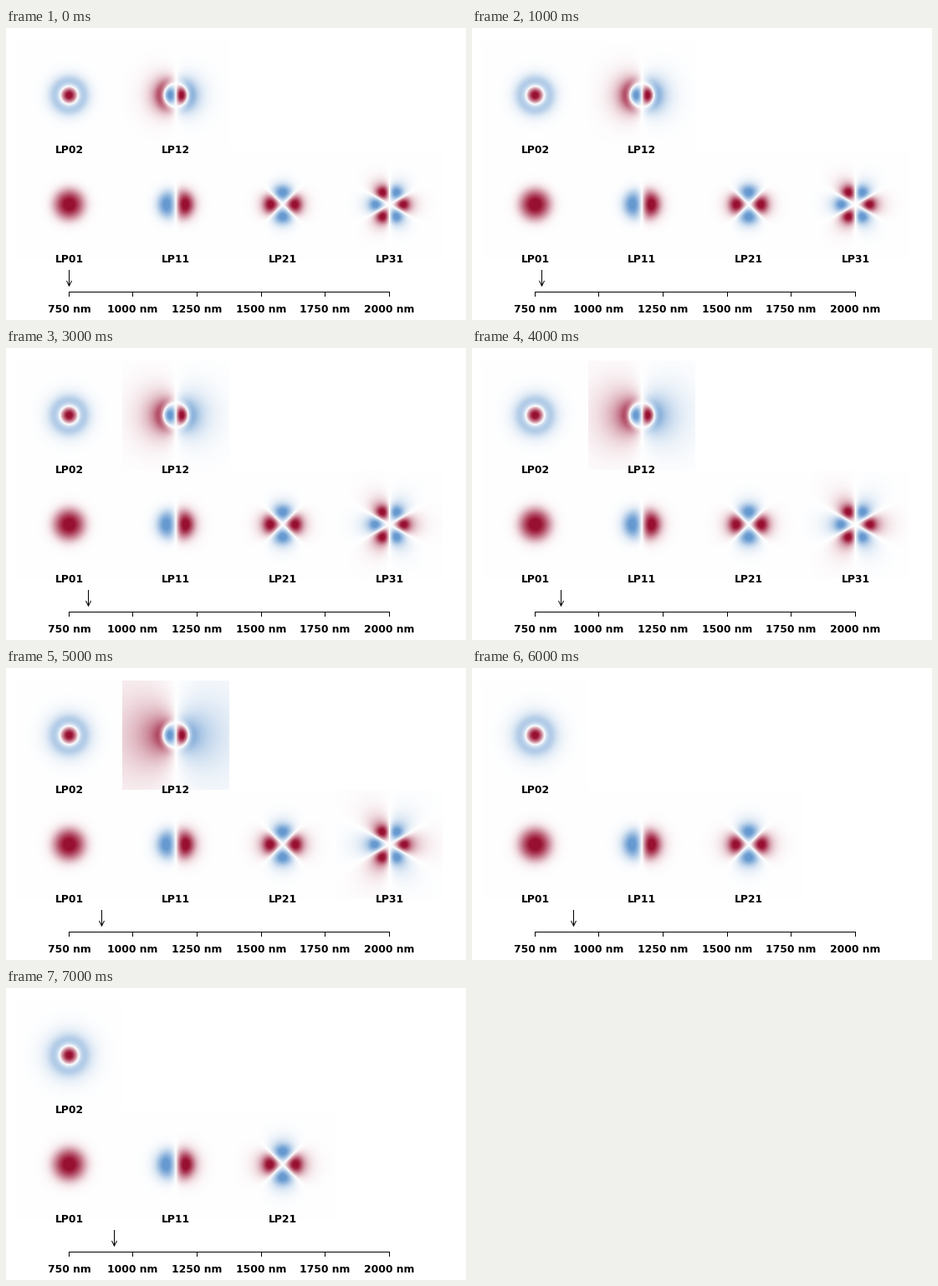
A matplotlib script that plays this animation: 550 px wide and 350 px high, repeating every 8 s.

```python
import numpy as np
import matplotlib.pyplot as plt
from matplotlib.animation import FuncAnimation

W, H, DPI = 550, 350, 100
STEPS = 8
CELL_W, CELL_H = 383 / 3, 130
LEFT, TOP_Y, BOTTOM_Y = 75.5, 80.5, 211.5
CORE = 25.5              # core radius in pixels
ALPHA = 5.3              # index profile exponent
CUTOFF_NM = 885          # wavelength at which LP12 stops being guided
RED = np.array([152, 16, 50]) / 255
BLUE = np.array([102, 153, 208]) / 255

# (l, m), column, row centre, wavelength from which the mode is gone
MODES = [
    ((0, 2), 0, TOP_Y, 2000),
    ((1, 2), 1, TOP_Y, CUTOFF_NM),
    ((0, 1), 0, BOTTOM_Y, 2000),
    ((1, 1), 1, BOTTOM_Y, 2000),
    ((2, 1), 2, BOTTOM_Y, 2000),
    ((3, 1), 3, BOTTOM_Y, CUTOFF_NM),
]

# radial grid in units of the core radius
N, R_MAX = 360, 12
STEP = R_MAX / N
RADII = (np.arange(N) + 0.5) * STEP
yy, xx = np.mgrid[0:H, 0:W] + 0.5


def radial_matrix(l, v):
    """Radial wave operator of azimuthal order l at normalised frequency v."""
    diag = 2 / STEP**2 + (l / RADII)**2 + v**2 * np.minimum(RADII, 1)**ALPHA
    edge = RADII[:-1] + STEP / 2
    off = -edge / (STEP**2 * np.sqrt(RADII[:-1] * RADII[1:]))
    return np.diag(diag) + np.diag(off, 1) + np.diag(off, -1)


def radial_modes(l, v):
    """Two lowest radial fields, scaled to a peak of 1."""
    vectors = np.linalg.eigh(radial_matrix(l, v))[1][:, :2]
    fields = (vectors / np.sqrt(RADII)[:, None]).T
    return [f / f[np.argmax(np.abs(f))] for f in fields]


def cutoff(l, m):
    """Normalised frequency at which mode (l, m) is just guided."""
    low, high = 4.0, 9.0
    for _ in range(14):
        v = (low + high) / 2
        guided = np.linalg.eigvalsh(radial_matrix(l, v))[m - 1] < v**2
        low, high = (low, v) if guided else (v, high)
    return high


def colorize(field):
    strength = np.clip(1.1 * np.abs(field)**0.9, 0, 1)[..., None]
    tint = np.where(field[..., None] > 0, RED, BLUE)
    return 1 + strength * (tint - 1)


def mode_picture(nm):
    picture = np.ones((H, W, 3))
    v = V_CUTOFF * CUTOFF_NM / nm
    radial = {l: radial_modes(l, v) for l in range(4)}
    for (l, m), col, cy, limit in MODES:
        if nm >= limit:
            continue
        dx, dy = xx - (LEFT + col * CELL_W), yy - cy
        cell = (np.abs(dx) <= CELL_W / 2) & (np.abs(dy) <= CELL_H / 2)
        r = np.hypot(dx, dy)[cell] / CORE
        angle = np.arctan2(dy, dx)[cell]
        field = np.interp(r, RADII, radial[l][m - 1]) * np.cos(l * angle)
        picture[cell] = colorize(field)
    return picture


def label(x, baseline, text):
    return ax.text(x, baseline, text, ha="center", va="baseline",
                   family="DejaVu Sans", weight="bold",
                   size=12.4 * 72 / DPI, color="black")


def stroke(xs, ys):
    return ax.plot(xs, ys, color="black", lw=72 / DPI, snap=False,
                   solid_capstyle="butt", solid_joinstyle="miter")[0]


fig = plt.figure(figsize=(W / DPI, H / DPI), dpi=DPI, facecolor="white")
ax = fig.add_axes([0, 0, 1, 1])
ax.axis("off")

V_CUTOFF = cutoff(1, 2)
wavelengths = [750 + 25 * k for k in range(STEPS)]
pictures = [mode_picture(nm) for nm in wavelengths]
image = ax.imshow(pictures[0], extent=(0, W, H, 0), interpolation="nearest",
                  aspect="auto")
ax.set_xlim(0, W)
ax.set_ylim(H, 0)

names = [label(LEFT + col * CELL_W, cy + 69.5, f"LP{l}{m}")
         for (l, m), col, cy, _ in MODES]

# wavelength scale
stroke([75, 459], [316.5, 316.5])
for k, nm in enumerate([750, 1000, 1250, 1500, 1750, 2000]):
    x = int(75.2 + 76.6 * k) + 0.5
    stroke([x, x], [316, 322])
    label(x, 341, f"{nm} nm")

shaft = stroke([], [])
head = stroke([], [])


def update(k):
    nm = wavelengths[k]
    image.set_data(pictures[k])
    for text, mode in zip(names, MODES):
        text.set_visible(nm < mode[3])
    x = round(75.2 + 7.66 * k) + 0.5
    shaft.set_data([x, x], [290, 309.5])
    head.set_data([x - 3, x, x + 3], [303, 309.2, 303])
    return [image, shaft, head, *names]


anim = FuncAnimation(fig, update, frames=STEPS, interval=1000,
                     repeat=True, repeat_delay=0, blit=False)
plt.show()
```
